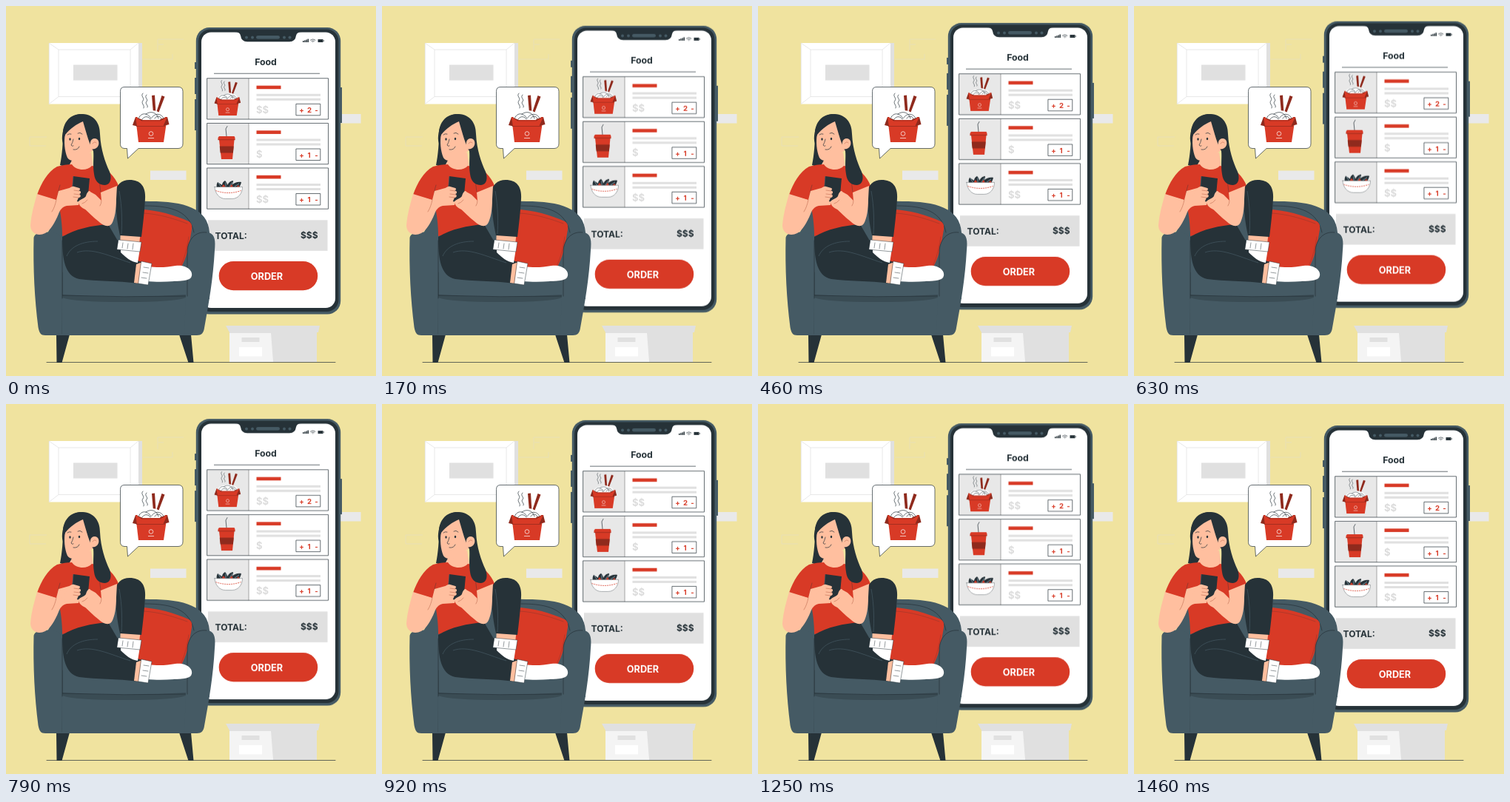
Write an HTML page that moves like this. It is 500 by 500 pixels and loops after 1500 ms.

```html
<!DOCTYPE html>
<html lang="en">
<head>
<meta charset="utf-8">
<title>Food order</title>
<style>
  html, body { margin: 0; width: 100%; height: 100%; overflow: hidden; background: #f0e39f; }
  svg { display: block; width: 100vw; height: 100vh; }
  text { font-family: Inter, "Open Sans", sans-serif; font-weight: 700; }
  .phone { animation: float 1.5s linear -20ms infinite; }
  @keyframes float {
    0%, 100% { transform: translateY(.3px); }
    50% { transform: translateY(-9.7px); }
  }
  .red { fill: #d83a26; }
  .maroon { fill: #8f2a1d; }
  .dark { fill: #263238; }
  .slate { fill: #455a64; }
  .skin { fill: #ffbf9f; }
  .grey { fill: #e0e0e0; }
  .white { fill: #fff; }
  .line { fill: none; stroke: #263238; stroke-width: .7; stroke-linecap: round; stroke-linejoin: round; }
  .fold { fill: none; stroke: #c9795e; stroke-width: .7; stroke-linecap: round; }
  .crease { fill: none; stroke: #455a64; stroke-width: .7; }
  .soft { fill: none; stroke: #e6dfba; stroke-width: .8; }
  .price { fill: #dcdcdc; font-size: 13px; }
  .count { fill: #d83a26; font-size: 9.6px; text-anchor: middle; }
</style>
</head>
<body>
<svg viewBox="0 0 500 500" xmlns="http://www.w3.org/2000/svg">
  <defs>
    <g id="noodles">
      <path class="line" d="M185 118c-4 4 3 6 0 10s3 6 1 10M190 120c-4 4 3 6 0 9s3 5 1 8"/>
      <path class="maroon" d="M197 121l4-.5 1.500 24h-3.500zM210.500 121l4 1.500-8 21-3-1z"/>
      <path class="red" d="M175 150h43l-5 34h-34z"/>
      <path class="white" d="M177 154c0-8 8-11 14-10 5-4 13-3 15 0 6 0 9 4 9 10z"/>
      <path class="line" d="M179 153c2-9 12-10 17-1M184 153c3-5 9-4 11 0M189 146c7-5 15-2 17 6M197 151c3-6 13-7 16 1M201 152c2-4 7-4 9 0"/>
      <path class="maroon" d="M175 150l-4 11 8 2 6-9zM218 150l2.500 10-7.500 2-5-9z"/>
      <path class="red" d="M175 150l8 5h26l9-5-6 13h-35z"/>
      <path d="M176 162.500h39M183 155h26" stroke="#8f2a1d" stroke-width=".7"/>
      <circle cx="196" cy="172.500" r="2.800" fill="none" stroke="#fff" stroke-width=".7"/>
      <path d="M192 178.500h8" stroke="#fff" stroke-width=".7"/>
    </g>
    <g id="card">
      <rect x="272" y="97.700" width="163.500" height="55.300" fill="#fff"/>
      <rect x="272" y="97.700" width="56" height="55.300" fill="#e8e8e8"/>
      <path d="M328 98v55" stroke="#b0b0b0" stroke-width="1.200"/>
      <rect class="line" x="272" y="97.700" width="163.500" height="55.300"/>
      <rect class="red" x="338.500" y="107.600" width="33" height="4.600"/>
      <path class="grey" d="M338.500 118.800H425v3H338.500zM338.500 124.800H425v3H338.500z"/>
      <rect class="line" x="392.300" y="132.300" width="32.500" height="15.500"/>
      <text class="count" x="399.500" y="143.800">+</text>
      <text class="count" x="419.500" y="143.800">-</text>
    </g>
  </defs>

  <rect width="500" height="500" fill="#f0e39f"/>

  <!-- wall and floor -->
  <path class="soft" d="M205 61V45h35M185 72h40v-7M206 52h7M55 177H32v12h22"/>
  <path class="grey" d="M178 50h6v83h-6z"/>
  <path class="white" d="M58 50h121v82.500H58z"/>
  <path d="M58 50l13 9h97l11-9M58 132.500l13-10h97l11 10M71 59v63.500M168 59v63.500M58.300 50v82.500" fill="none" stroke="#e2e2e2" stroke-width=".8"/>
  <rect class="grey" x="91" y="79.500" width="59.500" height="21"/>
  <path fill="#e9e9ea" d="M195 222.500h48.500V235H195zM450 146h29.500v12.500H450z"/>
  <path class="grey" d="M297 432h127l-2 9h-2v40H302v-40z"/>
  <path fill="#f4f4f4" d="M302 442h56l3 39h-59z"/>
  <rect class="grey" x="318.500" y="448" width="24" height="6"/>
  <rect class="white" x="315" y="461" width="31" height="12.500"/>
  <path class="line" d="M55 481.500H445"/>

  <g class="phone">
    <path class="slate" d="M255 76h3v9h-3zM255 97h3v22h-3zM255 126h3v42h-3zM451 110h3v48h-3z"/>
    <rect class="slate" x="256.800" y="29" width="195.400" height="387.500" rx="18"/>
    <rect class="dark" x="260" y="31.500" width="189.500" height="381.500" rx="16"/>
    <rect class="white" x="264" y="35.500" width="181" height="372.500" rx="13"/>
    <path class="dark" d="M309 35q7 0 8 5 1 8 9 8.300h57q8-.3 9-8.300 1-5 8-5z"/>
    <rect class="slate" x="338" y="40" width="32" height="4.600" rx="2.300"/>
    <g class="slate">
      <circle cx="325" cy="42.400" r="2"/><circle cx="333" cy="42.400" r="2"/>
      <circle cx="376" cy="42.400" r="2"/><circle cx="383.500" cy="42.400" r="2"/>
    </g>
    <path class="dark" d="M401 47h1.500v2H401zM403.200 46.300h1.500V49h-1.500zM405.400 45.500h1.500V49h-1.500zM407.500 44.500h1.500V49h-1.500z"/>
    <path class="line" d="M411.500 46q3.200-2.500 6.400 0M413 47.500q1.700-1.300 3.400 0M414.700 48.800v.1"/>
    <path class="dark" d="M421.500 45h7v4h-7zM429 46.200h.8v1.600h-.8z"/>
    <text class="dark" x="351" y="80" font-size="12.300" text-anchor="middle">Food</text>
    <path d="M281 91.200H424" stroke="#263238" stroke-width=".7"/>

    <use href="#card"/>
    <use href="#card" y="60.700"/>
    <use href="#card" y="121.200"/>
    <text class="price" x="338" y="144.800">$$</text>
    <text class="price" x="338" y="205.300">$</text>
    <text class="price" x="338" y="265.800">$$</text>
    <text class="count" x="410" y="143.800">2</text>
    <text class="count" x="409.500" y="204.500">1</text>
    <text class="count" x="409.500" y="265">1</text>

    <use href="#noodles" transform="translate(158.400 15.500) scale(.72)"/>

    <path class="line" d="M298 176l-1-10 2-3.500"/>
    <path class="red" d="M288 181h20.500l-2.500 26h-15z"/>
    <path class="maroon" d="M288.700 189.500h19l-.8 9h-17.300z"/>
    <path class="red" d="M288 176h20.500l1 2v3h-23v-3z"/>
    <path d="M286.500 180.700h23" stroke="#8f2a1d" stroke-width=".7"/>

    <path class="dark" d="M285 246c-1-4 0-6 1-8l6 4c0-3 2-5 4-6 2 2 3 4 3 6 2-4 5-6 8-6 0 3-1 4-2 6 3-3 8-5 13-4-1 4-2 6-4 8z"/>
    <path d="M287 239l4 6M297 238v6M306 238l-4 6M315 240l-6 4" stroke="#78909c" stroke-width="1"/>
    <path class="red" d="M291 245l3-4 3 4zM302 245l3-4 2 4zM311 245l3-3 2 3z"/>
    <path class="white" d="M282 244.500h37.500c0 9-6 16-14 16h-9c-8 0-14-7-14.500-16z"/>
    <path class="line" d="M282 244.500h37.500c0 9-6 16-14 16h-9c-8 0-14-7-14.500-16z" opacity=".5"/>
    <path d="M283.500 249.500q17 6 34 0" fill="none" stroke="#d83a26" stroke-width=".8" stroke-dasharray="2 1"/>

    <rect class="grey" x="273" y="289.300" width="161.500" height="41.500"/>
    <text class="dark" x="282.500" y="314.600" font-size="12">TOTAL:</text>
    <text class="dark" x="421.500" y="314.300" font-size="12" text-anchor="end">$$$</text>
    <rect class="red" x="287.700" y="345" width="133.500" height="39.300" rx="19.600"/>
    <text class="white" x="352.500" y="370.200" font-size="12.700" text-anchor="middle">ORDER</text>
  </g>

  <!-- speech bubble -->
  <path class="white" stroke="#263238" stroke-width=".7" d="M160 109.500h73q6 0 6 6V186q0 6-6 6.500H179l-14.500 13.500-1-13.500H160q-5.500-.5-5.500-6v-71q0-6 5.500-6z"/>
  <use href="#noodles"/>

  <!-- armchair -->
  <path class="dark" d="M68 444h18l-10.500 38H68.500zM234 444h16l3.500 38H246.500z"/>
  <path class="slate" d="M56 307c6-10 10-22 15-33 20-9 80-11 124-10 45 0 78 9 80 42v90H56z"/>
  <path class="line" d="M188 270c38 0 60 8 66 36"/>
  <path class="red" d="M180 275c24 0 49 8 67 16 5 3 5 8 3 17-3 18-6 33-14 46-18 3-44 1-62-6z"/>
  <path class="line" d="M186 280c20 1 40 7 59 14M247 312c-2 13-5 27-10 37" opacity=".3"/>
  <path class="slate" d="M73 357h174v88H73z"/>
  <path class="dark" opacity=".35" d="M76 390q84 6 167 0v4q-15 6-83 6t-84-6z"/>
  <path class="line" d="M76 360v31q84 3 167 1M75 393v50M244 394v50"/>
  <path class="slate" d="M37.500 313c1-6 10-8 20-7.500 12 0 18 4 19 14l-1 125.500H53c-6 0-8-3-9.500-11-5-38-7-80-6-121z"/>
  <path class="slate" d="M245 333c0-20 14-31 29-27 9 3 9 12 8 24-2 38-8 72-14 105-1 7-4 10-10 10h-17z"/>
  <path class="line" d="M76 317v78M245 392v-59c0-17 11-29 26-27"/>

  <!-- woman -->
  <path class="dark" d="M104 146c-16-1-25 9-27 23 0 17-1 31-4 46l30 10z"/>
  <path class="skin" d="M92 203l23-5 3 20c-6 12-27 10-33-2z"/>
  <path class="red" d="M69 217c7-2 14-3 20-3 5 8 20 10 27 2 9 1 20 5 25 10 5 5 9 11 11 17l-12 18c-2 14-1 24 0 35l-64 15c0-15-2-32-6-48l-28-8c6-16 14-31 27-38z"/>
  <path class="line" d="M70 262c0-8 1-14 3-20M128 251c-1-6-1-10-2-15" opacity=".5"/>
  <path class="dark" d="M76 312c18-11 39-15 62-17l14 24c9 15 20 24 34 28l-7 28c-30-4-56-3-80-6-20-4-23-28-23-57z"/>
  <path class="crease" d="M82 338c6-14 22-20 42-20M96 333c20-7 44 5 72 14"/>
  <path class="white" d="M155 328l26 0-3 19c-9-1-17-8-23-14z"/>
  <path class="skin" d="M155 305h27l-2 17h-26z"/>
  <path class="dark" d="M148 254c0-12 8-19 19-19 15 0 22 9 21 26-1 18-3 34-5 51l-29-2c-4-18-6-36-6-56z"/>
  <path class="crease" d="M153 250c4 22 4 44 3 58"/>
  <path class="white" d="M152 316l31 3-2 13-31-3z"/>
  <path class="line" d="M152 316l31 3-2 13-31-3zM158 320l-1 7M165 321l-1 7M172 321l-1 8" opacity=".7"/>
  <path class="skin" d="M176 349l8-3-4 29-7-1z"/>
  <path class="white" d="M192 352c14 2 26 1 37-1 14-2 24 6 22 14-1 6-12 7-24 7-13 1-24 1-38 0z"/>
  <path class="line" d="M227 372c12 0 23-1 24-7" opacity=".35"/>
  <path class="white" d="M183 345l14 3-5 29-13-2z"/>
  <path class="line" d="M183 345l14 3-5 29-13-2zM186 353l7 1M185 360l7 1M183 367l7 1" opacity=".7"/>

  <path class="skin" d="M42 254l26 8 3-12 18-5 12 10-3 14-16 1c-7 2-9 6-11 11-5 12-11 22-18 26-10 5-20 0-20-11 1-14 5-28 9-42z"/>
  <path class="skin" d="M128 252l22-9-1 18c0 14-2 26-6 33-4 6-12 3-18-3-7-5-14-13-20-18l-8-9 15-14 9 5 8 8z"/>
  <path class="dark" d="M91 230l22 3-3 33-22-3z"/>
  <path class="crease" d="M91 230l-2.500 33"/>
  <g class="skin">
    <path d="M83 252c1-5 5-9 9-8l7 2c2 1 1 3-1 3l2 1c2 1 1 4-1 4l1 1c2 2 0 4-2 4l-3 7-13 2-7-6z"/>
    <path d="M98 264c3-3 8-4 10-7 1-4 3-7 5-7 2 1 1 6 1 9l6 8-12 8c-6-2-10-6-10-11z"/>
  </g>
  <path class="fold" d="M92 249l7 1M92 254l8 1M91 258l7 1M68 262q-2 10-6 16M103 267q4-1 7-5M129 263q0 4-2 7"/>

  <path class="skin" d="M104 153c-12 3-22 8-24 19-2 11-1 24 3 33 5 8 21 4 28-5l13-10v-32z"/>
  <path class="dark" d="M104 146c15 1 23 12 23 27 1 21 7 38 13 51 3 8 2 17-6 18-9 0-14-6-15-15-2-12 0-22-1-31-5-8-9-23-14-40-9 4-17 9-24 18-2 4-2 10-2 16l-2-8c-1-20 10-37 28-36z"/>
  <path class="skin" d="M114 184c1-5 6-6 9-4 4 3 3 11-3 13-4 1-6 0-7-2z"/>
  <path class="fold" d="M117 186q3-4 5-1"/>
  <path class="line" d="M83 174q2-2 5-1M97 172q3-2 6 1"/>
  <ellipse class="dark" cx="86.500" cy="180" rx="1.200" ry="1.700"/>
  <ellipse class="dark" cx="99" cy="179.500" rx="1.200" ry="1.700"/>
  <path class="line" d="M91 180q-1 5-3 8 1 2 3 1M91 194q6 1 8-4"/>
</svg>
</body>
</html>
```
